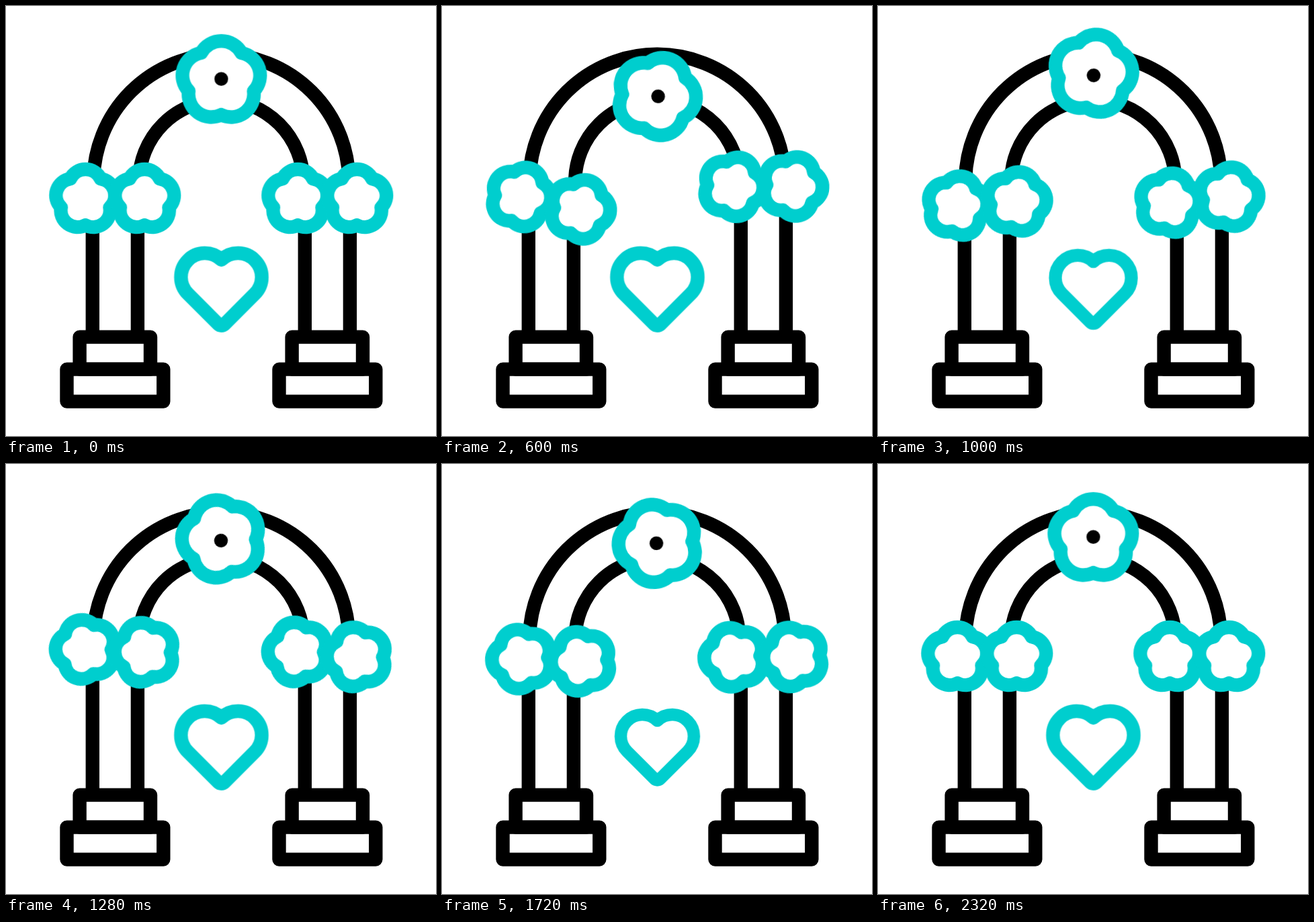
These frames come from a looping animation (640 px wide and 640 px high, 2360 ms). An HTML page:

```html
<!DOCTYPE html>
<html lang="en">
<head>
<meta charset="utf-8">
<title>Flower arch</title>
<style>
  html, body { margin: 0; width: 100%; height: 100%; overflow: hidden; background: #fff; }
  svg { display: block; width: 100%; height: 100%; }

  .line { fill: none; stroke: #000; stroke-width: 20.4; stroke-linejoin: round; }
  .teal { fill: #fff; stroke: #00cece; stroke-width: 20.4; stroke-linejoin: round; }

  .bob, .spin, .beat { animation: 2360ms infinite; }
  .bob { animation-name: bob; animation-timing-function: cubic-bezier(.333, 0, .667, 1); animation-delay: var(--d, 0ms); }
  .spin { animation-name: spin; animation-timing-function: linear; }
  .beat { animation-name: beat; animation-timing-function: cubic-bezier(.333, 0, .667, 1); }

  /* a swing every 280 ms, fading out */
  @keyframes bob {
    0% { transform: translateY(0); }
    11.864% { transform: translateY(24.6px); }
    23.729% { transform: translateY(-20.5px); }
    35.593% { transform: translateY(11.6px); }
    47.458% { transform: translateY(-10.1px); }
    59.322% { transform: translateY(8.1px); }
    71.186%, 100% { transform: translateY(0); }
  }
  @keyframes spin {
    0% { transform: rotate(0deg); }
    98.305%, 100% { transform: rotate(360deg); }
  }
  /* 280 ms pulses, 800 ms apart */
  @keyframes beat {
    0%, 11.864%, 33.898%, 45.763%, 67.797%, 79.661%, 100% { transform: scale(1); }
    5.932%, 39.831%, 73.729% { transform: scale(.9); }
  }
</style>
</head>
<body>
<svg viewBox="0 0 640 640">
  <defs>
    <path id="small" class="teal" transform="translate(0 1)"
      d="M-22.5-30.9A25 25 0 0 1 22.5-30.9A25 25 0 0 1 36.3 11.8A25 25 0 0 1 0 38.2A25 25 0 0 1-36.3 11.8A25 25 0 0 1-22.5-30.9Z"/>
    <g id="base" class="line">
      <path d="M128.8 285V492M195.9 285V492"/>
      <path d="M109.6 492.6H215V540.6H109.6Z"/>
      <path d="M90.5 540.6H234.3V588.6H90.5Z"/>
    </g>
  </defs>

  <g class="line">
    <path d="M130.1 285V262A190.2 190.2 0 0 1 510.5 262V285"/>
    <path d="M198.1 285V262A122.2 122.2 0 0 1 442.5 262V285"/>
  </g>
  <use href="#base"/>
  <use href="#base" x="316"/>

  <g transform="translate(118.3 287)"><g class="bob" style="--d:160ms"><g class="spin"><use href="#small"/></g></g></g>
  <g transform="translate(206.3 287)"><g class="bob" style="--d:240ms"><g class="spin"><use href="#small"/></g></g></g>
  <g transform="translate(434.3 287)"><g class="bob" style="--d:80ms"><g class="spin"><use href="#small"/></g></g></g>
  <g transform="translate(522.3 287)"><g class="bob"><g class="spin"><use href="#small"/></g></g></g>

  <g transform="translate(320.4 109.8)"><g class="bob" style="--d:320ms"><g class="spin">
    <path class="teal" transform="translate(0 1.2)"
      d="M-29.9-41.2A34 34 0 0 1 29.9-41.2A34 34 0 0 1 48.4 15.7A34 34 0 0 1 0 50.9A34 34 0 0 1-48.4 15.7A34 34 0 0 1-29.9-41.2Z"/>
    <circle cy="-1.2" r="10.2"/>
  </g></g></g>

  <g transform="translate(320.5 421.8)"><g class="beat">
    <path class="teal"
      d="M0-44A35.5 35.5 0 0 0-49.6 6.8L-4.5 51.9A6.4 6.4 0 0 0 4.5 51.9L49.6 6.8A35.5 35.5 0 0 0 0-44Z"/>
  </g></g>
</svg>
</body>
</html>
```
